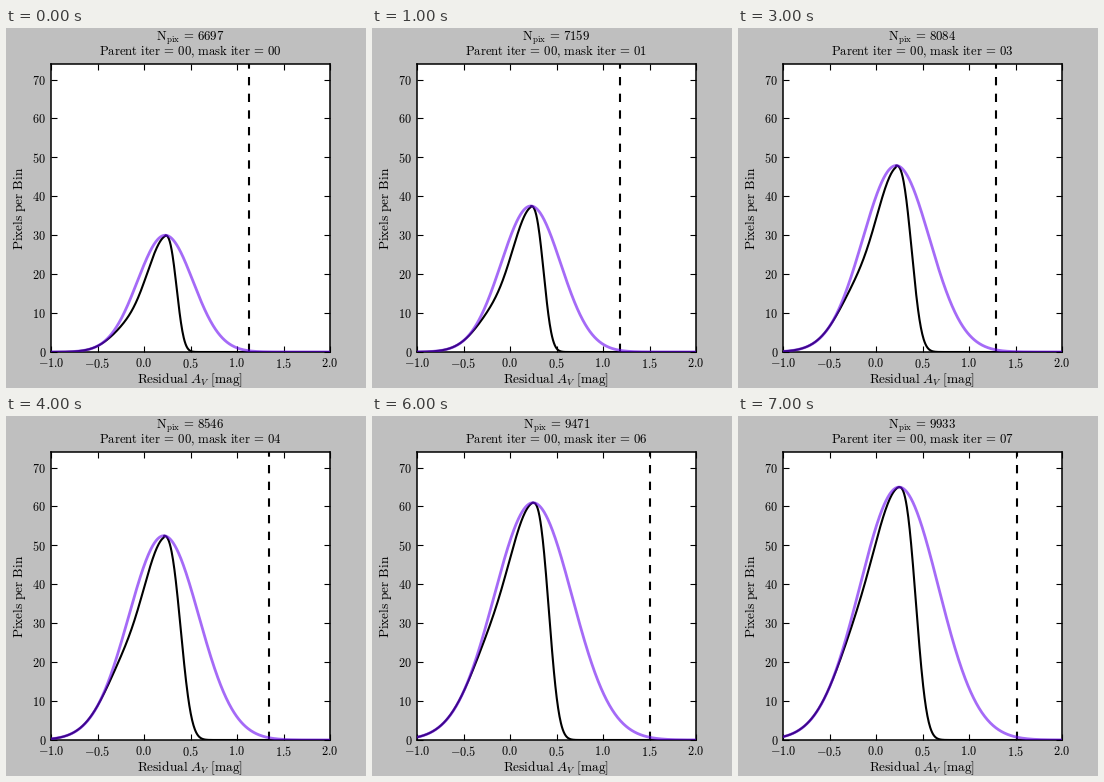
Write a matplotlib script that moves like this. It is 360 px wide and 360 px high and loops after 8000 ms.

```python
import matplotlib.pyplot as plt
import numpy as np
from matplotlib.animation import FuncAnimation

SIZE, DPI = 360, 100
STEPS = 8
plt.rcParams.update({"mathtext.fontset": "cm", "lines.scale_dashes": False})

x = np.linspace(-1, 2, 600)


def fit_params(step):
    """Peak, mean, sigma and three-sigma cut of the fitted Gaussian."""
    peak = 30 + 7.52 * step ** 0.79
    mean = np.interp(step, [0, 4, 6], [0.228, 0.213, 0.248])
    cut = np.interp(step, [0, 2, 4, 5, 6, 7], [1.124, 1.247, 1.344, 1.441, 1.505, 1.516])
    return peak, mean, (cut - mean) / 3, cut


def histogram(step, gauss, peak, mean):
    # The left flank follows the fit with a damped dip; the right one falls steeply.
    u = x + 0.13
    dip = (0.27 - 0.025 * step) * np.exp(-(u / 0.35) ** 2) * np.cos(4.2 * u)
    half = 0.358 + 0.0115 * step - mean
    right = peak * 0.5 ** (np.maximum(x - mean, 0) / half) ** 2.6
    return np.where(x < mean, gauss * (1 - dip), right)


def roman(text):
    return r"\mathrm{" + text.replace(" ", r"\ ") + "}"


def label(px, py, text="", size=9.6, **kw):
    return fig.text(px / SIZE, 1 - py / SIZE, text, fontsize=size, ha="center",
                    va="baseline", **kw)


fig = plt.figure(figsize=(SIZE / DPI, SIZE / DPI), dpi=DPI, facecolor="0.75")
ax = fig.add_axes([0.125, 0.1, 0.775, 0.8])
ax.set(xlim=(-1, 2), ylim=(0, 74))
xticks = np.arange(-1, 2.1, 0.5)
yticks = np.arange(0, 71, 10)
ax.set_xticks(xticks, [f"${v:.1f}$" for v in xticks])
ax.set_yticks(yticks, [f"${v}$" for v in yticks])
ax.tick_params(direction="in", top=True, right=True, length=4, width=0.8,
               labelsize=8.8, pad=3.5)
for spine in ax.spines.values():
    spine.set_linewidth(1.1)

hist, = ax.plot([], [], color="black", lw=1.5, zorder=2)
fit, = ax.plot([], [], color="#6a08f2", alpha=0.6, lw=2, zorder=3)
limit = ax.axvline(1, color="black", lw=1.5, ls=(0, (6, 6)), zorder=2)

count = label(184.5, 13, size=9.2)
title = label(184.5, 27.5, size=9.2)
label(184.5, 355, f"${roman('Residual ')}A_V{roman(' [mag]')}$")
label(17.5, 180, f"${roman('Pixels per Bin')}$", rotation=90, rotation_mode="anchor")


def update(step):
    peak, mean, sigma, cut = fit_params(step)
    gauss = peak * np.exp(-0.5 * ((x - mean) / sigma) ** 2)
    hist.set_data(x, histogram(step, gauss, peak, mean))
    fit.set_data(x, gauss)
    limit.set_xdata([cut, cut])
    pixels = int(6697 + 462.36 * step)
    equals = r"\,=\,"
    count.set_text(f"${roman('N')}_{{{roman('pix')}}}{equals}{pixels}$")
    title.set_text(f"${roman('Parent iter')}{equals}00{{,}}"
                   f"{roman(' mask iter')}{equals}{step:02d}$")
    return hist, fit, limit, count, title


anim = FuncAnimation(fig, update, frames=STEPS, interval=1000, repeat=True)
plt.show()
```
